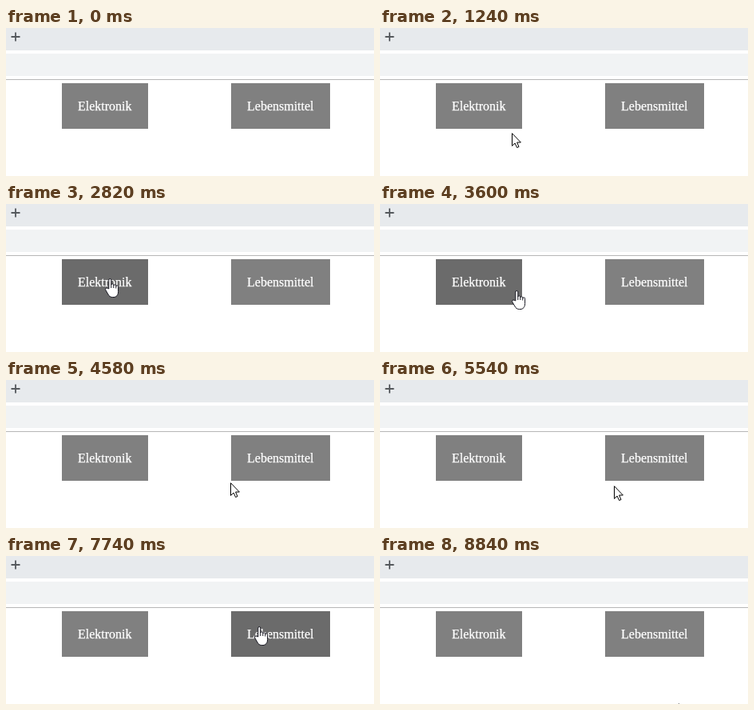
An HTML page for the animation above (9120 ms loop, 461 px wide and 185 px high).

```html
<!DOCTYPE html>
<html lang="de">
<head>
<meta charset="utf-8">
<title>Hover</title>
<style>
html, body { margin: 0; width: 100%; height: 100%; overflow: hidden; background: #fff; }
#stage { position: relative; width: 461px; height: 185px; overflow: hidden; background: #fff; }
#stage > * { position: absolute; }
.strip { left: 0; width: 461px; }
.tabs { top: 0; height: 28px; background: #e7eaed; }
.bar { top: 32px; height: 28px; background: #f1f3f4; }
.rule { top: 64px; height: 1px; background: #b6b6b6; }
.button {
  top: 69px; height: 57px; box-sizing: border-box; padding: 20px; white-space: nowrap;
  font: 16px/18px "Liberation Serif", "Times New Roman", serif; color: #fff; background: #808080;
  -webkit-text-stroke: 0.25px #fff;
}
.button.hover { background: #6b6b6b; }
svg { left: 0; top: 0; }
#arrow, #hand { fill: #fff; stroke: #000; stroke-linejoin: round; }
#hand { stroke: #15151f; }
</style>
</head>
<body>
<div id="stage">
  <div class="strip tabs"></div>
  <div class="strip bar"></div>
  <div class="strip rule"></div>
  <div class="button" style="left:70px;width:108px">Elektronik</div>
  <div class="button" style="left:282px;width:124px">Lebensmittel</div>
  <svg width="461" height="185">
    <path d="M6.5 11H17.5M12 5.5V16.5" stroke="#55595d" stroke-width="1.8"/>
    <path id="arrow" d="M.5 .7V16.4L4.1 13L6.6 18.5L9 17.5L6.6 12H11.4Z"/>
    <g id="hand">
      <path d="M-1.2 13V2a1.5 1.5 0 0 1 3 0V8a1.5 1.3 0 0 1 3 .3V9a1.5 1.3 0 0 1 3 .3V10a1.4 1.3 0 0 1 2.8 .4V16.5C10.6 21 8 23.5 5 23.5H3.5C.5 23.5-1 22-2 20L-5.2 14.5C-6 12.5-4.3 11.3-2.8 12.3Z"/>
      <path fill="none" d="M1.8 8V12M4.8 9V12M7.8 10V12.5"/>
    </g>
  </svg>
</div>
<script>
const LOOP = 9120, START = 270, STEP = 40;

// pointer waypoints: time, x, y
const path = [
  [START, 223, 180], [1150, 170, 134], [1600, 144, 117], [2080, 136, 119],
  [2400, 111, 104], [2650, 120, 88], [3010, 143, 99], [3600, 171, 108],
  [3970, 199, 139], [4560, 281, 128], [4990, 290, 116], [5310, 291, 119],
  [5580, 293, 136], [5770, 293, 136], [6040, 295, 116], [6310, 295, 137],
  [6520, 295, 136], [7720, 317, 88], [8380, 367, 160], [8560, 374, 174],
  [8800, 374, 174], [8840, 374, 184]
];

const arrow = document.getElementById("arrow");
const hand = document.getElementById("hand");
const buttons = [...document.querySelectorAll(".button")];

function pointerAt(t) {
  const i = path.findIndex(p => p[0] > t);
  if (i < 0) return path[path.length - 1].slice(1);
  if (i === 0) return path[0].slice(1);
  const [a, b] = [path[i - 1], path[i]];
  const k = (t - a[0]) / (b[0] - a[0]);
  return [1, 2].map(n => Math.round(a[n] + (b[n] - a[n]) * k));
}

function contains(el, x, y) {
  const dx = x - el.offsetLeft, dy = y - el.offsetTop;
  return dx >= 0 && dx < el.offsetWidth && dy >= 0 && dy < el.offsetHeight;
}

function place(shape, shown, x, y) {
  shape.style.display = shown ? "" : "none";
  shape.setAttribute("transform", `translate(${x} ${y})`);
}

function draw(t) {
  const visible = t >= START;
  const [x, y] = pointerAt(Math.floor(t / STEP) * STEP);
  const target = visible && buttons.find(el => contains(el, x, y));
  buttons.forEach(el => el.classList.toggle("hover", el === target));
  place(arrow, visible && !target, x, y);
  place(hand, visible && target, x, y);
}

const begin = performance.now();
function tick() {
  draw((performance.now() - begin) % LOOP);
  requestAnimationFrame(tick);
}
tick();
</script>
</body>
</html>
```
